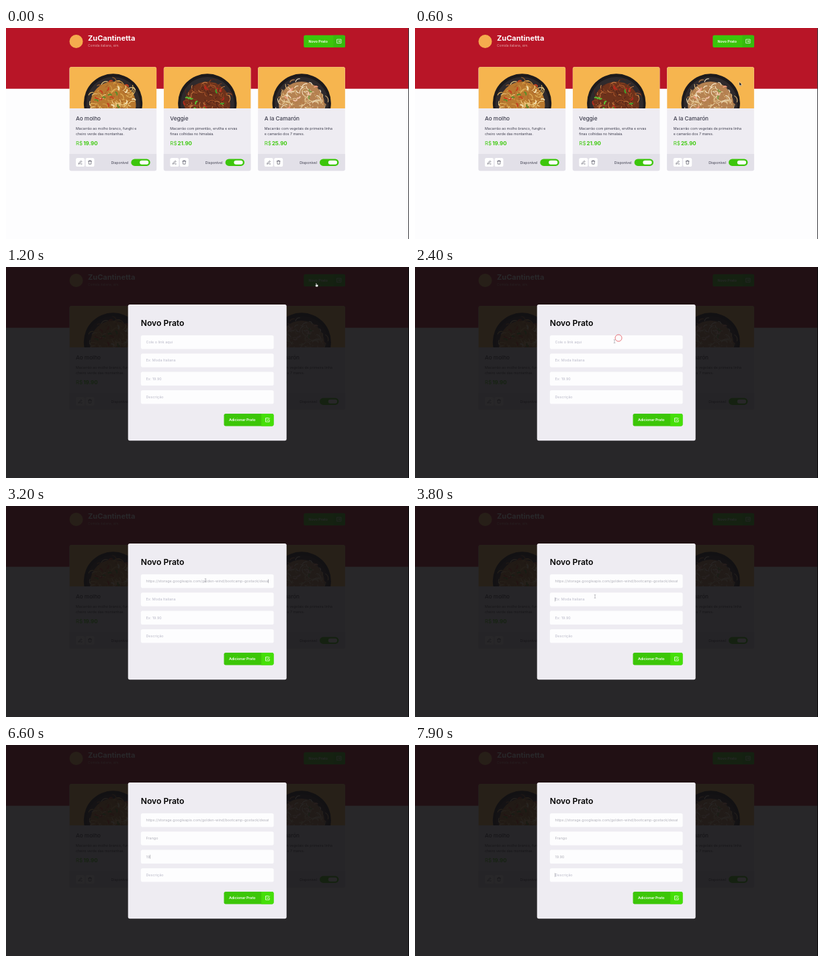
An HTML page with a canvas that plays this animation: 600 by 315 pixels, repeating every 8000 ms.

```html
<!DOCTYPE html>
<html lang="pt-BR">
<head>
<meta charset="utf-8">
<title>Novo Prato</title>
<style>
html, body { margin: 0; width: 100%; height: 100%; overflow: hidden; background: #fff; }
canvas { display: block; width: 600px; height: 315px; }
</style>
</head>
<body>
<canvas id="stage"></canvas>
<script>
const LOOP = 8000, STEP = 100, W = 600, H = 315, R = 2.6;
const stage = document.getElementById('stage');
const dpr = window.devicePixelRatio || 1;
stage.width = W * dpr;
stage.height = H * dpr;
let c = stage.getContext('2d');

const INK = '#3d3d4d', PRICE = '#3fca10', WHITE = '#fff', CARD = '#eeecf2';
const VEIL = 'rgba(17, 16, 18, 0.9)';

const DISHES = [
  { x: 94.5, name: 'Ao molho', price: '19.90', seed: 7,
    lines: ['Macarrão ao molho branco, funghi e', 'cheiro verde das montanhas.'],
    base: '#b9782f', noodles: ['#e3b45c', '#d09a45', '#f0cf86', '#a8642a'], bits: ['#5d8c2c', '#c4401f', '#f3dfae'] },
  { x: 234.8, name: 'Veggie', price: '21.90', seed: 23,
    lines: ['Macarrão com pimentão, ervilha e ervas', 'finas colhidas no himalaia.'],
    base: '#6d321b', noodles: ['#a8542a', '#86401f', '#c67a42', '#53251a'], bits: ['#3fa32c', '#59c436', '#b32a1c'] },
  { x: 375.2, name: 'A la Camarón', price: '25.90', seed: 41,
    lines: ['Macarrão com vegetais de primeira linha', 'e camarão dos 7 mares.'],
    base: '#b58252', noodles: ['#ead0a0', '#d8b378', '#f5e6c8', '#b57c48'], bits: ['#ec9c7c', '#f4c3ab', '#7d9a45'] }
];

const FIELDS = [
  { y: 102, hint: 'Cole o link aqui' },
  { y: 129.3, hint: 'Ex: Moda Italiana' },
  { y: 156.6, hint: 'Ex: 19.90' },
  { y: 183.9, hint: 'Descrição' }
];
const LINK = 'https://storage.googleapis.com/golden-wind/bootcamp-gostack/desafio-food/food3.png';

function random(seed) {
  return () => (seed = (seed * 16807) % 2147483647) / 2147483647;
}

function box(x, y, w, h, r, fill) {
  c.beginPath();
  c.roundRect(x, y, w, h, r);
  c.fillStyle = fill;
  c.fill();
}

function disc(x, y, r, fill) {
  c.beginPath();
  c.arc(x, y, r, 0, 7);
  c.fillStyle = fill;
  c.fill();
}

function text(str, x, y, size, fill, weight = 400) {
  c.font = `${weight} ${size}px Inter, "Open Sans", sans-serif`;
  c.fillStyle = fill;
  c.fillText(str, x, y);
  return c.measureText(str).width;
}

function path(d, x, y, stroke, width, fill) {
  c.save();
  c.translate(x, y);
  const p = new Path2D(d);
  if (fill) { c.fillStyle = fill; c.fill(p); }
  c.strokeStyle = stroke;
  c.lineWidth = width;
  c.lineCap = c.lineJoin = 'round';
  c.stroke(p);
  c.restore();
}

function photo(dish) {
  const { x } = dish, cx = x + 65, cy = 112, rnd = random(dish.seed);
  c.save();
  c.beginPath();
  c.roundRect(x, 58.3, 129.6, 61.7, [R, R, 0, 0]);
  c.clip();
  c.fillStyle = '#f6b54f';
  c.fillRect(x, 58, 130, 62);
  disc(cx, cy, 43.7, '#1d1a1c');
  disc(cx, cy + 1, 40, '#2f2a2c');
  disc(cx, cy + 2, 34, dish.base);
  const spot = () => {
    const a = rnd() * 6.28, r = 33 * Math.sqrt(rnd());
    return [cx + Math.cos(a) * r, cy + 1 + Math.sin(a) * r];
  };
  const strand = (radius, sweep, width, color) => {
    const [px, py] = spot(), a = rnd() * 6.28;
    c.beginPath();
    c.arc(px, py, radius, a, a + sweep);
    c.lineWidth = width;
    c.strokeStyle = color;
    c.stroke();
  };
  c.lineCap = 'round';
  for (let i = 0; i < 130; i++) strand(3 + rnd() * 6, 1.3, 1.1, dish.noodles[i % 4]);
  for (let i = 0; i < 24; i++) strand(3.5, 1.4, 2, dish.bits[i % 3]);
  c.restore();
}

function card(dish) {
  const { x } = dish, left = x + 9.5;
  box(x, 58.3, 129.6, 154.9, R, CARD);
  box(x, 188, 129.6, 25.2, [0, 0, R, R], '#e2e0e8');
  photo(dish);
  text(dish.name, left, 138, 8.2, INK, 500);
  dish.lines.forEach((line, i) => text(line, left, 151.8 + i * 8, 5.25, INK));
  text('R$', left, 175.2, 7.9, PRICE);
  text(dish.price, left + 11.2, 175.2, 7.9, PRICE, 700);

  box(left, 194, 13, 13, R, WHITE);
  box(left + 14.5, 194, 13, 13, R, WHITE);
  path('M-2.4 2.4 L-2.1 1 L1.2 -2.3 L2.3 -1.2 L-1 2.1 Z M0.6 2.5 H2.6', left + 6.5, 200.5, INK, 0.6);
  path('M-2.5 -1.6 H2.5 M-1.9 -1.6 L-1.7 2.7 H1.7 L1.9 -1.6 M-0.9 -1.8 V-2.7 H0.9 V-1.8', left + 21, 200.5, INK, 0.6);
  text('Disponível', x + 62, 202.5, 5.25, INK);
  box(x + 91.8, 195.4, 28.4, 10.5, 5.25, '#3cc60b');
  box(x + 104.6, 197.7, 13.2, 6, 3, WHITE);
}

function home() {
  c.fillStyle = '#fdfdfe';
  c.fillRect(0, 0, W, H);
  c.fillStyle = '#b81527';
  c.fillRect(0, 0, W, 90.7);
  disc(104.5, 20, 10, '#f5ab4e');
  text('ZuCantinetta', 122, 18.6, 11, WHITE, 700);
  text('Comida italiana, sim.', 122, 27.5, 4.8, '#e0a3a5');
  box(443.3, 10.8, 61.7, 18.2, R, '#3bc60b');
  box(487.5, 10.8, 17.5, 18.2, [0, R, R, 0], '#37ba0e');
  text('Novo Prato', 450.6, 21.8, 5.3, WHITE, 600);
  path('M-3 -2.8 H3 V2.8 H-3 Z M-1.4 0 H1.4 M0.5 -1 L1.5 0 L0.5 1', 496, 19.8, WHITE, 0.7);
  DISHES.forEach(card);
}

// Both backgrounds are static, so they are painted once.
function prerender(veiled) {
  const layer = document.createElement('canvas'), main = c;
  layer.width = stage.width;
  layer.height = stage.height;
  c = layer.getContext('2d');
  c.scale(dpr, dpr);
  home();
  if (veiled) {
    c.fillStyle = VEIL;
    c.fillRect(0, 0, W, H);
  }
  c.fillStyle = veiled ? '#08080a' : '#3b3b40';
  c.fillRect(599, 0, 1, H);
  c = main;
  return layer;
}

function typed(str, t, start, gap) {
  return str.slice(0, Math.max(0, Math.floor((t - start) / gap) + 1));
}

function modal(t) {
  box(181.7, 56, 236, 203.2, R, CARD);
  text('Novo Prato', 200.8, 88, 12.1, '#000', 600);
  const values = [
    t >= 3000 ? LINK : '',
    typed('Frango', t, 4400, 150),
    t >= 6800 ? typed('19.90', t, 6400, 200) : typed('19', t, 6300, 200),
    ''
  ];
  const focus = t < 2500 ? -1 : t < 3700 ? 0 : t < 5500 ? 1 : t < 7600 ? 2 : 3;
  FIELDS.forEach((f, i) => {
    box(200.8, f.y, 197.8, 20.4, R, '#fdfdfe');
    c.save();
    c.beginPath();
    c.rect(207, f.y, 184, 20.4);
    c.clip();
    c.letterSpacing = '0.05px';
    const value = values[i], base = f.y + 12.1;
    const w = text(value || f.hint, 208.4, base, 5.4, value ? '#b1b1ba' : '#b9b9c8');
    const blink = t % 1000 >= 500 || (value && t < 5300);
    if (i === focus && blink) {
      c.fillStyle = '#80808a';
      c.fillRect(Math.min(208.4 + (value ? w + 0.2 : 0), 390), f.y + 7.2, 0.5, 6);
    }
    c.restore();
  });
  box(324.5, 219, 74, 18.4, R, '#3cc608');
  box(380.2, 219, 18.3, 18.4, [0, R, R, 0], '#45df08');
  text('Adicionar Prato', 332, 230.2, 5.3, WHITE, 600);
  path('M2.7 0 V2.7 H-2.9 V-2.9 H1.5 M-1.3 -0.5 L0 0.8 L3.1 -2.6', 389.4, 228.4, WHITE, 0.8);
}

// time, x, y
const TRACK = [
  [100, 528, 201], [900, 462, 25], [1300, 462, 25], [1700, 303, 106],
  [2200, 303, 106], [2400, 297, 111], [3300, 297, 111], [3700, 268, 135], [4300, 268, 135]
];

function pointerAt(t) {
  if (t < TRACK[0][0] || t >= 4300) return null;
  const i = TRACK.findIndex(k => k[0] > t);
  const [t0, x0, y0] = TRACK[i - 1], [t1, x1, y1] = TRACK[i];
  const u = (t - t0) / (t1 - t0), e = u * u * (3 - 2 * u);
  return [x0 + (x1 - x0) * e, y0 + (y1 - y0) * e];
}

function pointer(t) {
  const at = pointerAt(t);
  if (!at) return;
  const [x, y] = at;
  const overField = t >= 1200 && x > 201 && x < 398 && FIELDS.some(f => y > f.y && y < f.y + 20.4);
  const overButton = x > 443 && x < 505 && y > 11 && y < 29;
  if (overField) {
    path('M-0.9 -2.6 Q0 -2.6 0 -2 V2 Q0 2.6 -0.9 2.6 M0.9 -2.6 Q0 -2.6 0 -2 M0 2 Q0 2.6 0.9 2.6', x, y, '#85858c', 0.5);
  } else if (overButton) {
    path('M-0.6 0 Q0 -0.7 0.5 0 V1.8 L2.2 2.2 Q2.8 2.5 2.6 3.5 L2.1 5.2 H-0.5 L-1.8 3.2 Q-1.9 2.5 -0.6 3 Z', x, y - 0.6, '#222', 0.3, WHITE);
  } else {
    path('M0 0 V5.4 L1.3 4.3 L2.2 6.2 L3 5.8 L2.1 4 H3.8 Z', x, y, WHITE, 0.4, '#111');
  }
  if (t >= 2300 && t < 2600) {
    c.beginPath();
    c.arc(303, 106, 3 + (t - 2200) / 100, 0, 7);
    c.lineWidth = 0.8;
    c.strokeStyle = '#e2545a';
    c.stroke();
  }
}

const bright = prerender(false), dark = prerender(true);

function draw(now) {
  const t = Math.floor((now % LOOP) / STEP) * STEP;
  const open = t >= 1200;
  c.setTransform(1, 0, 0, 1, 0, 0);
  c.drawImage(open ? dark : bright, 0, 0);
  c.scale(dpr, dpr);
  if (open) modal(t);
  pointer(t);
}

const start = performance.now();
function tick() {
  draw(performance.now() - start);
  requestAnimationFrame(tick);
}
tick();
</script>
</body>
</html>
```
